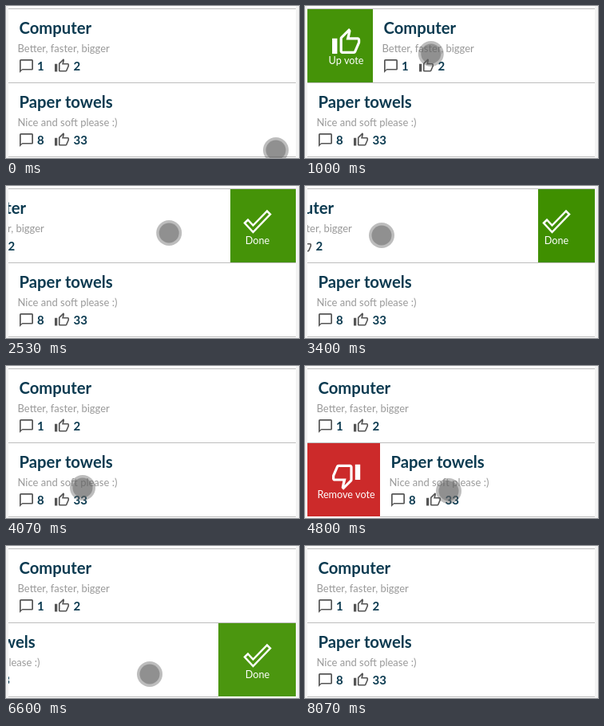
These frames come from a looping animation (367x191 px, 8790 ms). An HTML page with a canvas:

```html
<!DOCTYPE html>
<html lang="en">
<head>
<meta charset="utf-8">
<title>Swipe list</title>
<style>
  html, body { margin: 0; width: 100%; height: 100%; overflow: hidden; background: #fff; }
  canvas { display: block; width: 367px; height: 191px; }
</style>
</head>
<body>
<canvas id="stage"></canvas>
<script>
const W = 367, H = 191, LOOP = 8790, TICK = 1000 / 15;
const LEFT = 3, RIGHT = 363, ROW_H = 93;
const canvas = document.getElementById('stage');
const ctx = canvas.getContext('2d');
const dpr = window.devicePixelRatio || 1;
canvas.width = W * dpr;
canvas.height = H * dpr;

const bubble = new Path2D('M20 2H4c-1.1 0-2 .9-2 2v18l4-4h14c1.1 0 2-.9 2-2V4c0-1.1-.9-2-2-2zm0 14H6l-2 2V4h16v12z');
const thumb = new Path2D('M9 21h9c.83 0 1.54-.5 1.84-1.22l3.02-7.05c.09-.23.14-.47.14-.73v-2c0-1.1-.9-2-2-2h-6.31l.95-4.57.03-.32c0-.41-.17-.79-.44-1.06L14.17 1 7.58 7.59C7.22 7.95 7 8.45 7 9v10c0 1.1.9 2 2 2zM9 9l4.34-4.34L12 10h9v2l-3 7H9V9zM1 9h4v12H1z');
const check = new Path2D('M299 46.5L303 42.5 309.5 49.5 327 31.5 331 35.5 309.5 58z');

// Keys are [tick, value, ...]; 15 ticks per second.
const pointer = [
  [0, 338, 181], [9, 72, 62], [12, 72, 62], [19, 290, 57], [22, 290, 57],
  [25, 244, 56], [27, 249, 56], [31, 290, 57], [35, 290, 57], [42, 72, 62], [47, 72, 62],
  [51, 96, 62], [54, 110, 66], [61, 96, 153], [63, 72, 155], [67, 72, 155],
  [72, 180, 157], [76, 284, 159], [83, 284, 159], [87, 240, 159], [92, 286, 159], [94, 286, 159],
  [99, 180, 161], [103, 72, 161], [111, 72, 161], [115, 96, 161], [121, 120, 215]
];
const rows = [
  {
    title: 'Computer', note: 'Better, faster, bigger', comments: '1', votes: '2',
    label: 'Up vote', down: false, color: [63, 143, 0],
    slide: [[12, 0], [16, 97], [22, 97], [27, 44], [31, 0], [35, 0], [39, -97], [47, -97], [51, -71], [56, 0]]
  },
  {
    title: 'Paper towels', note: 'Nice and soft please :)', comments: '8', votes: '33',
    label: 'Remove vote', down: true, color: [201, 28, 28],
    slide: [[67, 0], [72, 91], [73, 97], [83, 97], [87, 62], [92, 0], [94, 0], [99, -97], [111, -97], [115, -71], [121, 0]]
  }
];

// Smooth curve through the keys, resting at every turning point.
function sample(keys, t, col = 1) {
  const last = keys.length - 1;
  if (t <= keys[0][0]) return keys[0][col];
  if (t >= keys[last][0]) return keys[last][col];
  let i = 0;
  while (keys[i + 1][0] <= t) i++;
  const slope = n => n < 0 || n >= last ? 0 :
    (keys[n + 1][col] - keys[n][col]) / (keys[n + 1][0] - keys[n][0]);
  const tangent = n => {
    const a = slope(n - 1), b = slope(n);
    return a * b > 0 ? 2 * a * b / (a + b) : 0;
  };
  const h = keys[i + 1][0] - keys[i][0], u = (t - keys[i][0]) / h;
  const s = u * u * (3 - 2 * u);
  return keys[i][col] * (1 - s) + keys[i + 1][col] * s +
    h * u * (1 - u) * ((1 - u) * tangent(i) - u * tangent(i + 1));
}

function rect(x, y, w, h, color) {
  ctx.fillStyle = color;
  ctx.fillRect(x, y, w, h);
}

function text(str, x, y, font, color, align = 'left') {
  ctx.font = font + ' Lato, "Open Sans", sans-serif';
  ctx.fillStyle = color;
  ctx.textAlign = align;
  ctx.fillText(str, x, y);
}

function icon(path, x, y, scale, color, flip) {
  ctx.save();
  ctx.translate(x, y);
  ctx.scale(scale, scale);
  if (flip) {
    ctx.translate(24, 24);
    ctx.rotate(Math.PI);
  }
  ctx.fillStyle = color;
  ctx.fill(path);
  ctx.restore();
}

function panel(row, shift) {
  const glow = Math.min(1, Math.max(0, (Math.abs(shift) - 71) / 20)) * 0.06;
  const base = shift > 0 ? row.color : rows[0].color;
  const tint = base.map(c => Math.round(c + (255 - c) * glow));
  rect(LEFT, 4, RIGHT - LEFT, ROW_H - 1, `rgb(${tint})`);
  if (shift > 0) {
    icon(thumb, 32.4, row.down ? 26 : 26.4, 1.6, '#fff', row.down);
    text(row.label, 51.5, 73, '12.6px', '#fff', 'center');
  } else {
    ctx.strokeStyle = '#fff';
    ctx.lineWidth = 2.5;
    ctx.stroke(check);
    text('Done', 315, 73, '12.6px', '#fff', 'center');
  }
}

function drawRow(row, index, tick) {
  const shift = Math.round(sample(row.slide, tick));
  ctx.save();
  ctx.translate(0, index * ROW_H);
  ctx.beginPath();
  ctx.rect(LEFT, 3, RIGHT - LEFT, ROW_H + 1);
  ctx.clip();
  if (shift) panel(row, shift);
  ctx.translate(shift, 0);
  rect(LEFT, 3, RIGHT - LEFT, ROW_H + 1, '#fff');
  rect(LEFT, 3, RIGHT - LEFT, 1, '#bdbdbd');
  rect(LEFT, 96, RIGHT - LEFT, 1, '#bdbdbd');
  text(row.title, 16.5, 35, 'bold 20.3px', '#0b3a50');
  text(row.note, 14.5, 58, '13px', '#999');
  icon(bubble, 15.3, 65.3, 0.85, '#555');
  text(row.comments, 39, 81, 'bold 15px', '#0b3a50');
  icon(thumb, 60.2, 65.4, 0.82, '#555');
  text(row.votes, 84.5, 81, 'bold 15px', '#0b3a50');
  ctx.restore();
}

function disc(x, y, r, color) {
  ctx.fillStyle = color;
  ctx.beginPath();
  ctx.arc(x, y, r, 0, Math.PI * 2);
  ctx.fill();
}

function draw(ms) {
  const tick = Math.floor((ms + 4) / TICK);
  ctx.setTransform(dpr, 0, 0, dpr, 0, 0);
  rect(0, 0, W, H, '#fff');
  rect(0, 0, LEFT, H, '#f3f3f3');
  rect(RIGHT, 0, W - RIGHT, H, '#f3f3f3');
  rows.forEach((row, i) => drawRow(row, i, tick));
  rect(LEFT, 3, RIGHT - LEFT, 1, '#bdbdbd');
  if (tick < 121) {
    const x = sample(pointer, tick, 1), y = sample(pointer, tick, 2);
    disc(x, y, 16, 'rgba(90,90,90,.4)');
    disc(x, y, 12.5, 'rgba(100,100,100,.5)');
  }
}

const start = performance.now();
function loop() {
  draw((performance.now() - start) % LOOP);
  requestAnimationFrame(loop);
}
loop();
</script>
</body>
</html>
```
